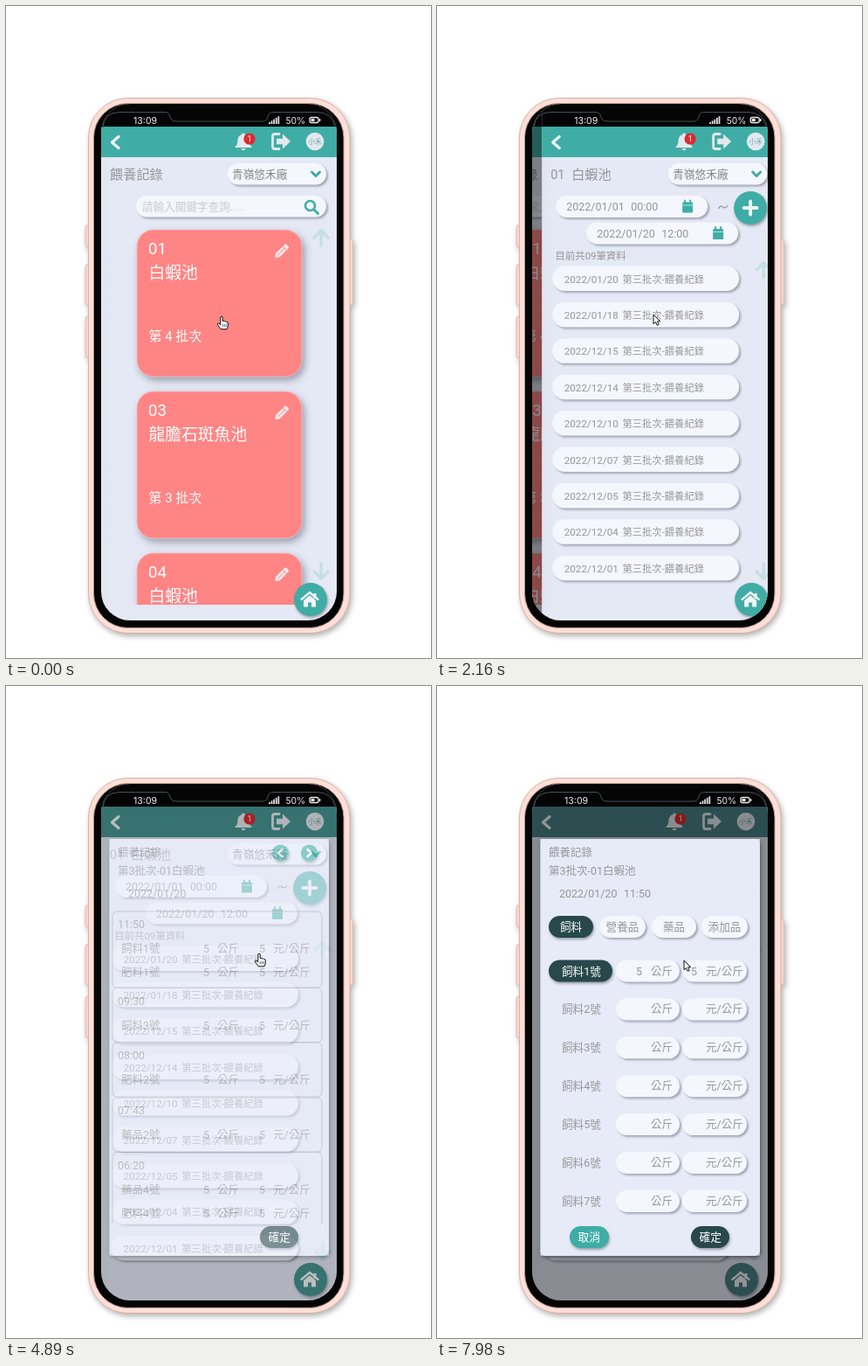
Write an HTML page that moves like this. It is 487 px wide and 746 px high and loops after 8000 ms.

```html
<!DOCTYPE html>
<html lang="zh-Hant">
<head>
<meta charset="utf-8">
<title>餵養記錄</title>
<style>
  html, body { margin: 0; width: 100%; height: 100%; overflow: hidden; background: #fff; }
  svg { display: block; width: 100%; height: 100%; --bar: #3fada5; }
  text { font-family: Roboto, "Noto Sans CJK TC", "Noto Sans CJK JP", "Noto Sans CJK", sans-serif; white-space: pre; }
  .bar { fill: var(--bar); }
  .pill { fill: #f4f7fd; filter: drop-shadow(2px 2px 1px rgba(95, 100, 115, .5)); }
  .btn { filter: drop-shadow(1.5px 2px 1.5px rgba(70, 80, 90, .5)); }
  .card { fill: #ff8585; stroke: #f3c3c6; stroke-width: .8; filter: drop-shadow(3px 4px 4px rgba(90, 95, 110, .55)); }
  .modal { fill: #e7ebf8; filter: drop-shadow(1.5px 2px 2px rgba(20, 25, 35, .5)); }
  .line { fill: none; stroke-linecap: round; stroke-linejoin: round; }
</style>
</head>
<body>
<svg id="stage" viewBox="0 0 487 746"></svg>
<script>
const TEAL = '#3fada5', DARK = '#28484a', GREY = '#969699', PALE = '#c4e0e3', SOFT = '#e3e8ee';
const LOOP = 8000;

// Drawing helpers
const text = (x, y, str, size = 12.5, fill = GREY, extra = '') =>
  `<text x="${x}" y="${y}" font-size="${size}" fill="${fill}" ${extra}>${str}</text>`;
const rect = (x, y, w, h, r, attrs) =>
  `<rect x="${x}" y="${y}" width="${w}" height="${h}" rx="${r}" ${attrs}/>`;
const circle = (x, y, r, attrs) => `<circle cx="${x}" cy="${y}" r="${r}" ${attrs}/>`;
const line = (d, color, width) =>
  `<path class="line" d="${d}" stroke="${color}" stroke-width="${width}"/>`;
const pill = (x, y, w, h) => rect(x, y, w, h, h / 2, 'class="pill"');
const button = (x, y, w, h, fill) => rect(x, y, w, h, h / 2, `class="btn" fill="${fill}"`);
const at = (x, y, body, more = '') => `<g transform="translate(${x} ${y}) ${more}">${body}</g>`;
const repeat = (n, fn) => Array.from({ length: n }, (_, i) => fn(i)).join('');

// Icons
const pencil = (x, y) => at(x, y,
  `<path d="M-10 0L-6-3.1H8Q10-3.1 10-1.1V1.1Q10 3.1 8 3.1H-6Z" fill="#fbe9ea"/>
   <path d="M5.5-3.1V3.1M-6 0H5.5" stroke="#f29a9c" stroke-width="1"/>`, 'rotate(-45)');
const calendar = (x, y) => at(x, y,
  rect(-6, -5, 12, 12, 1.3, `fill="${TEAL}"`) +
  line('M-3-7V-4M3-7V-4', TEAL, 2) + line('M-6-1.6H6', '#d9efee', .8));
const arrow = (x, y, dir) => at(x, y, line('M0 9V-8M-8 0L0-8.5L8 0', PALE, 3.4), `scale(1 ${dir})`);
const home = () => circle(349, 679, 19, 'class="bar btn"') + at(348, 679,
  line('M-9.5 0L0-8L9.5 0', '#f2f5f8', 2.3) +
  '<path d="M4.5-7H7.5V-1H4.5ZM-7 1.2L0-4.7L7 1.2V8.5H2V3.5H-2V8.5H-7Z" fill="#f2f5f8"/>');
const bell = () => at(272, 155,
  `<path d="M-1.5-9.5H1.5V-8C5-7 6.5-4 6.5-1C6.5 3 8 4.5 9.5 6V7H-9.5V6C-8 4.5-6.5 3-6.5-1C-6.5-4-5-7-1.5-8Z" fill="${SOFT}"/>
   <path d="M-2.5 8H2.5Q2 10.3 0 10.3T-2.5 8Z" fill="${SOFT}"/>`) +
  circle(279, 152, 6.6, 'fill="#dc2b31"') + text(279, 155.3, '1', 9, '#fff', 'text-anchor="middle"');
const logout = () => at(315, 155,
  line('M-2-8.5H-7Q-9.5-8.5-9.5-6V6Q-9.5 8.5-7 8.5H-2', SOFT, 2.8) +
  `<path d="M-5-3.3H2V-8.5L11 0L2 8.5V3.3H-5Z" fill="${SOFT}"/>`);

const statusBar = () =>
  rect(109, 112, 271, 27, 0, 'fill="#050505"') +
  text(146, 134.5, '13:09', 10.6, '#eee', 'style="font-family:Inter,sans-serif"') +
  repeat(5, i => rect(301 + i * 2.6, 133 - i * 1.7, 1.8, 2 + i * 1.7, 0, 'fill="#ddd"')) +
  text(320.5, 134.5, '50%', 10.3, '#eee', 'style="font-family:Inter,sans-serif"') +
  rect(348, 127.5, 10, 6, 2, 'fill="none" stroke="#eee" stroke-width="1.3"') +
  rect(349.5, 129, 4, 3, .5, 'fill="#eee"') + rect(358.8, 129, 1.5, 3, .5, 'fill="#eee"');

const frame = body => `
  <rect x="109" y="112" width="271" height="592" fill="url(#paper)"/>
  ${statusBar()}
  <rect class="bar" x="109" y="138" width="271" height="35"/>
  ${line('M129 149.5L121.5 156L129 162.5', '#eef3f5', 3.3)}
  ${bell()}${logout()}
  ${circle(354, 155, 10.3, `fill="${SOFT}"`)}
  ${text(354, 158, '小禾', 7.8, '#67a9a8', 'text-anchor="middle"')}
  ${pill(254, 180, 113, 24.5)}
  ${text(259, 196.5, '青嶺悠禾廠', 12.7, '#858589')}
  ${line('M350.5 190L355 194.5L359.5 190', TEAL, 3)}
  ${body}${home()}`;

const card = (y, no, name, batch) =>
  rect(150, y, 189, 168, 19, 'class="card"') +
  text(163, y + 28, no, 18.7, '#fff') + text(163.5, y + 56, name, 18.8, '#fff') +
  text(163.5, y + 126.5, `第 ${batch} 批次`, 15, '#fff') + pencil(315.5, y + 25);

const ponds = () => frame(
  text(119, 197.5, '餵養記錄', 15.2) +
  pill(149, 217, 218, 24.5) + text(156, 233.5, '請輸入關鍵字查詢.....', 12.6, '#cacbd0') +
  circle(348.5, 228.5, 5.5, `fill="none" stroke="${TEAL}" stroke-width="2.6"`) +
  line('M353 233L357.5 237.5', TEAL, 3) +
  `<g clip-path="url(#cards)">${card(256, '01', '白蝦池', 4)}${card(441, '03', '龍膽石斑魚池', 3)}${card(626, '04', '白蝦池', 2)}</g>` +
  arrow(361, 265, 1) + arrow(361, 647, -1));

const days = ['01/20', '01/18', '12/15', '12/14', '12/10', '12/07', '12/05', '12/04', '12/01'];
const datePill = (x, y, day, time) =>
  pill(x, y, 174, 25) + text(x + 12, y + 17.3, day) + text(x + 86, y + 17.3, time) + calendar(x + 151, y + 12.5);

const records = () => frame(
  text(119, 197.5, '01', 14.5) + text(143, 197.5, '白蝦池', 15.2) +
  datePill(125, 217, '2022/01/01', '00:00') + datePill(160, 247.5, '2022/01/20', '12:00') +
  line('M311.5 231.5Q313.5 227.5 316.5 230T321.5 228.5', GREY, 1.3) +
  circle(348, 231, 19, `class="btn" fill="${TEAL}"`) +
  line('M348 223.5V238.5M340.5 231H355.5', '#eef5f7', 3.8) +
  text(124.3, 289.5, '目前共09筆資料', 11.4) +
  days.map((d, i) => {
    const y = 297.5 + i * 41.4;
    return pill(121, y, 214, 28.5) + text(134.5, y + 19, '2022/' + d, 11.7) +
      text(201.3, y + 19, '第三批次-餵養紀錄', 11.3);
  }).join('') +
  arrow(363, 302, 1) + arrow(363, 647, -1));

// Dialogs
const dialog = body =>
  rect(118.5, 175, 251.5, 477, 5, 'class="modal"') +
  text(128, 195, '餵養記錄') + text(128, 216, '第3批次-01白蝦池') + text(140, 242, '2022/01/20') +
  body + button(291, 618, 44, 25, DARK) + text(300.5, 635, '確定', 12.8, '#fff');

const navButton = (x, dir) => circle(x, 191, 9.5, `class="btn" fill="${TEAL}"`) +
  at(x, 191, line('M-2-4L2.5 0L-2 4', '#fff', 2.6), `scale(${dir} 1)`);

const group = (y, h, time, items) =>
  rect(122, y, 240, h, 5, 'fill="none" stroke="#b0b0bb"') + text(128, y + 19, time) +
  items.map((name, i) => {
    const b = y + 47 + i * 27;
    return text(132, b, name) + text(226, b, '5') + text(242, b, '公斤') +
      text(290, b, '5') + text(306, b, '元/公斤');
  }).join('');

const summary = () => dialog(
  navButton(314.5, -1) + navButton(347.5, 1) +
  `<g clip-path="url(#groups)">` +
  group(258, 87, '11:50', ['飼料1號', '肥料1號']) + group(345.5, 62, '09:30', ['飼料3號']) +
  group(408, 62, '08:00', ['肥料2號']) + group(471, 62, '07:43', ['藥品2號']) +
  group(533.5, 100, '06:20', ['藥品4號', '肥料4號']) + '</g>');

const tab = (x, w, name, on) =>
  (on ? button(x, 263, w, 25, DARK) : pill(x, 263, w, 25)) +
  text(x + w / 2, 280, name, 12.6, on ? '#fff' : GREY, 'text-anchor="middle"');

const feedRow = i => {
  const y = 326 + i * 43.9, b = y + 4.5;
  return (i ? '' : button(128, y - 12.5, 73, 25, DARK)) +
    text(143, b, `飼料${i + 1}號`, 12.6, i ? GREY : '#fff') +
    pill(205, y - 12.5, 73, 25) + pill(281, y - 12.5, 74, 25) +
    (i ? '' : text(228, b, '5') + text(291, b, '5')) +
    text(245, b, '公斤') + text(308, b, '元/公斤');
};

const editor = () => dialog(
  text(214, 242, '11:50') +
  tab(128, 51, '飼料', true) + tab(186, 53, '營養品') + tab(246, 51, '藥品') + tab(303, 53, '添加品') +
  repeat(7, feedRow) +
  button(152, 618, 45, 25, TEAL) + text(161.5, 635, '取消', 12.8, '#fff'));

const sideKey = (x, y, h) => rect(x, y, 5, h, 2, 'fill="#f8d6ce" stroke="#d9b8b0" stroke-width=".8"');

const stage = document.getElementById('stage');
stage.innerHTML = `
  <defs>
    <linearGradient id="paper"><stop offset="0" stop-color="#e1e5ef"/><stop offset=".06" stop-color="#e5e9f5"/><stop offset="1" stop-color="#e5e9f5"/></linearGradient>
    <clipPath id="screen">${rect(109, 112, 270, 591, 33, '')}</clipPath>
    <clipPath id="cards">${rect(109, 245, 271, 440, 0, '')}</clipPath>
    <clipPath id="groups">${rect(119, 250, 251, 365, 0, '')}</clipPath>
  </defs>
  <g style="filter:drop-shadow(2px 3px 3px rgba(60,60,60,.4))">
    ${sideKey(91, 251, 25)}${sideKey(91, 296, 46)}${sideKey(91, 355, 47)}${sideKey(392.5, 267, 75)}
    ${rect(94.5, 105.5, 299.5, 612, 45, 'fill="#fddfd7" stroke="#d8b3aa"')}
  </g>
  ${rect(100.5, 111.5, 286.5, 600, 39, 'fill="#050505" stroke="#b8958d"')}
  <g clip-path="url(#screen)">
    <g id="back">${ponds()}</g>
    <rect id="shade" x="109" y="138" width="271" height="566"/>
    <g id="front">${records()}</g>
    <path id="scrim" fill-rule="evenodd" d="M109 138H380V704H109ZM118.5 175V652H370V175Z"/>
    <g id="first">${summary()}</g>
    <g id="second">${editor()}</g>
  </g>
  ${line('M111 139Q112 122 130 121.5H183Q187 122 188 127Q189 132 196 132H293Q299 132 300 127Q301 121.5 306 121.5H357Q373 122 377 137', '#455258', 1)}
  <g id="arrow"><path d="M0 0V10.8L2.5 8.5L4.3 12.4L6.2 11.5L4.5 7.8H7.8Z" fill="#fff" stroke="#111"/></g>
  <g id="hand"><path d="M-1.2.8Q0-.6 1.2.8V5.5Q2.3 4.7 3.3 6Q4.5 5.2 5.4 6.6Q7.3 6 7.3 8V11Q7 13 6 14.8H-.8Q-2.5 12.5-4.6 9.3Q-4.7 7.6-3 8L-1.2 9.8Z" fill="#fff" stroke="#111"/>
    <path d="M1.3 9V12M3.3 9V12M5.2 9V12" stroke="#333" stroke-width=".7"/></g>`;

const el = {};
for (const id of ['back', 'shade', 'front', 'scrim', 'first', 'second', 'arrow', 'hand'])
  el[id] = document.getElementById(id);

// cubic-bezier(0, 0, .58, 1)
function easeOut(x) {
  if (x <= 0) return 0;
  if (x >= 1) return 1;
  let lo = 0, hi = 1;
  for (let i = 0; i < 24; i++) {
    const s = (lo + hi) / 2;
    if (1.74 * (1 - s) * s * s + s ** 3 < x) lo = s; else hi = s;
  }
  return lo * lo * (3 - 2 * lo);
}
const PUSH = 1909, OPEN = 4768, SWAP = 7450;
const phase = (t, start) => easeOut((t - start) / 300);
const mix = (a, b, p) => a + (b - a) * p;

// Pointer keys: time, x, y
const track = [[0, 247, 355], [1700, 247, 355], [1900, 248, 353], [2500, 248, 353], [2910, 258.5, 330],
  [3500, 290, 306], [4900, 290, 306], [5600, 286, 308], [7300, 286, 308], [7900, 283, 314], [LOOP, 283, 314]];
function pointer(t) {
  const i = track.findIndex(k => k[0] > t);
  const [t0, x0, y0] = track[i - 1], [t1, x1, y1] = track[i];
  const p = (t - t0) / (t1 - t0);
  return [mix(x0, x1, p), mix(y0, y1, p)];
}

const show = (node, opacity) => {
  node.style.display = opacity > 0 ? '' : 'none';
  node.setAttribute('opacity', opacity);
};

function render(t) {
  const push = phase(t, PUSH), open = phase(t, OPEN), swap = phase(t, SWAP);
  el.back.setAttribute('transform', `translate(${-67 * push} 0)`);
  show(el.back, push < 1 ? 1 : 0);
  show(el.shade, push < 1 ? .48 * push : 0);
  el.front.setAttribute('transform', `translate(${271 * (1 - push)} 0)`);
  show(el.front, push > 0 ? 1 : 0);
  show(el.scrim, .4 * open);
  stage.style.setProperty('--bar', `rgb(${mix(63, 73, open)},${mix(173, 130, open)},${mix(165, 133, open)})`);
  show(el.first, swap < 1 ? open : 0);
  show(el.second, swap);

  const [x, y] = pointer(t);
  const hand = t < PUSH || (t > 2910 && y < 327 && t < SWAP);
  show(el.hand, hand ? 1 : 0);
  show(el.arrow, hand ? 0 : 1);
  (hand ? el.hand : el.arrow).setAttribute('transform', `translate(${x} ${y})`);
}

const begin = performance.now();
function tick() {
  render((performance.now() - begin) % LOOP);
  requestAnimationFrame(tick);
}
render(0);
requestAnimationFrame(tick);
</script>
</body>
</html>
```
